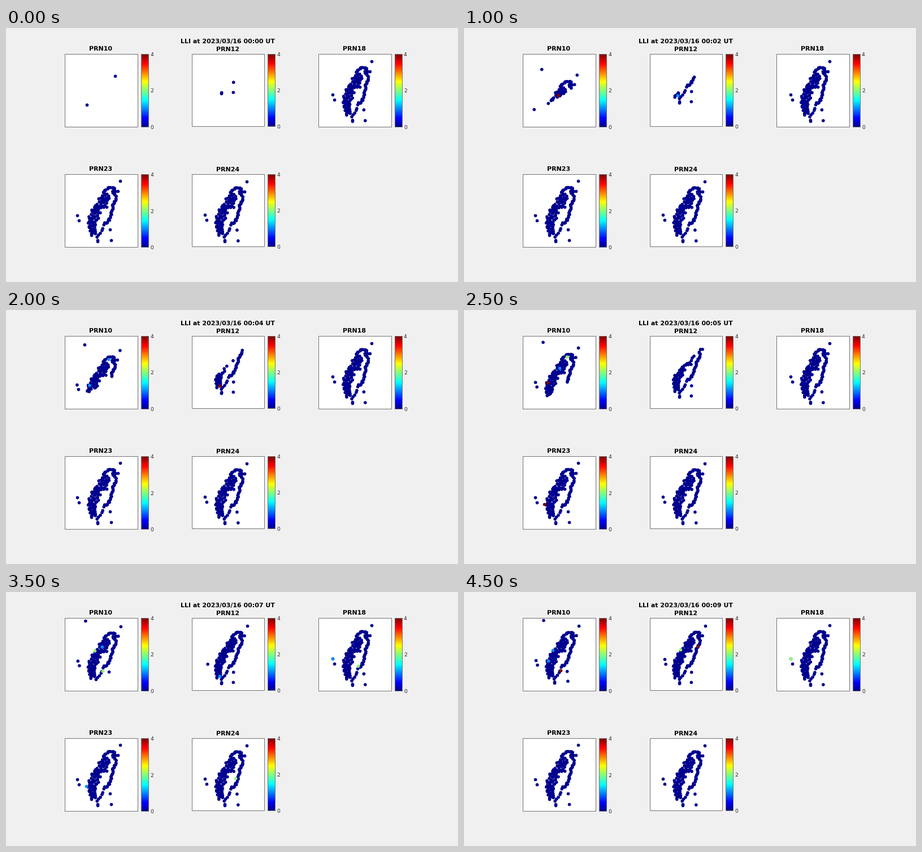
These frames come from a looping animation (800x450 px, 5 s). A matplotlib script:

```python
import numpy as np
import matplotlib.pyplot as plt
from matplotlib.animation import FuncAnimation
from matplotlib.colors import ListedColormap
from matplotlib.patches import Rectangle

W, H, DPI = 800, 450, 100
PX = 72 / DPI
FRAMES, STEP = 10, 500
LEVELS = 64

ramp = np.arange(1, LEVELS + 1) / LEVELS
JET = np.clip([1.5 - abs(4 * ramp - c) for c in (3, 2, 1)], 0, 1).T

# name: left, top, size and where the north-east, west and south stations appear
PANELS = {
    "PRN10": (104, 46, 129, [(99, 14), (23, 75), (56, 115)]),
    "PRN12": (329, 46, 128, [(98, 14), (26, 73), (52, 116)]),
    "PRN18": (553, 46, 129, [(94, 13), (25, 72), (60, 119)]),
    "PRN23": (104, 259, 129, [(98, 12), (22, 73), (58, 119)]),
    "PRN24": (329, 259, 128, [(97, 13), (23, 72), (58, 119)]),
}

# Stations off the main island and at its southern end
ISLETS = [(98, 12), (94, 30), (22, 73), (25, 82), (80, 98), (82, 117),
          (58, 119), (58, 117), (47, 108)]
CAP = [(68, 30), (79, 23), (85, 23), (90, 29)]
EAST = [(84, 30), (91, 42), (85, 55), (81, 72), (75, 86), (70, 86)]
SOUTH = [(69, 90), (68, 95), (58, 112)]
SHORE = [(67, 31), (61, 42), (49, 59), (38, 85), (47, 106)]
HILLS = [(80, 35), (75, 57), (62, 60), (62, 75), (54, 84), (55, 106)]

# Cycle slips: panel, place, first minute, level in each minute from then on
SLIPS = [
    ("PRN10", 66, 50, 2, "400101"),
    ("PRN10", 53, 57, 4, "000201"),
    ("PRN10", 79, 30, 4, "12"),
    ("PRN10", 45, 76, 4, "144001"),
    ("PRN10", 67, 93, 6, "1224"),
    ("PRN12", 49, 103, 2, "104011"),
    ("PRN12", 54, 56, 6, "4002"),
    ("PRN12", 85, 50, 6, "2004"),
    ("PRN18", 70, 85, 6, "42"),
    ("PRN18", 25, 72, 7, "122"),
    ("PRN23", 38, 85, 5, "441"),
    ("PRN24", 77, 71, 7, "2"),
]


def along(path, t):
    path = np.array(path, float)
    run = np.r_[0, np.cumsum(np.hypot(*np.diff(path, axis=0).T))]
    at = np.asarray(t) * run[-1]
    return np.c_[np.interp(at, run, path[:, 0]), np.interp(at, run, path[:, 1])]


def plain(count):
    """Spread stations evenly between the western shore and the hills."""
    i = np.arange(count)
    t = (i + 0.5) / count
    across = (i * 0.618 % 1)[:, None]
    return along(SHORE, t) * (1 - across) + along(HILLS, t) * across


def build_stations():
    rng = np.random.default_rng(7)
    coast = [along(path, np.linspace(0, 1, n))
             for path, n in ((CAP, 14), (EAST, 30), (SOUTH, 6))]
    land = np.vstack(coast + [plain(80)])
    return np.vstack([ISLETS, land + rng.uniform(-1.4, 1.4, land.shape)])


def affine_terms(points):
    return np.c_[np.asarray(points, float), np.ones(len(points))]


def project(name):
    fit = np.linalg.solve(affine_terms(PANELS["PRN23"][3]), PANELS[name][3])
    return affine_terms(stations) @ fit


stations = build_stations()
MAPS = {name: project(name) for name in PANELS}
MAPS["PRN10"] = np.vstack([MAPS["PRN10"], (36.5, 4)])


def settle(size, minute, end, power):
    return size * max(0, 1 - minute / end) ** power


def drift(name, minute):
    if name == "PRN10":
        dy = settle(38, minute, 8, 1.75)
        return np.array([-dy / 7, dy])
    if name == "PRN12":
        return np.array([0, -settle(46, minute, 6.5, 1.2)])
    return np.zeros(2)


def visible(name, minute):
    p = MAPS[name]
    x, y = p.T
    if name == "PRN10":
        if minute == 0:  # only two receivers have lock yet
            return np.array([(89, 39), (39, 90)])
        p = p[y + 0.7 * x < 79 + 10.2 * minute]
    elif name == "PRN12":
        p = p[x + y > 165.5 - 9.35 * minute]
    return p + drift(name, minute)


def label(x, y, text, size=11, **style):
    return ax.text(x, y, text, fontsize=size * PX, family="DejaVu Sans", **style)


def outline(x, y, w, h, face, z):
    ax.add_patch(Rectangle((x + 0.5, y + 0.5), w, h, fc=face, ec="0.45",
                           lw=PX, snap=False, zorder=z))


def draw_panel(name):
    left, top, size, _ = PANELS[name]
    outline(left, top, size, size, "white", 1)
    bar = left + size + 6
    ax.imshow(np.arange(LEVELS)[::-1, None], cmap=ListedColormap(JET),
              extent=(bar, bar + 13, top + size, top),
              aspect="auto", interpolation="nearest")
    outline(bar, top, 13, size, "none", 2)
    for level in (0, 2, 4):
        label(bar + 16, top + size * (1 - level / 4) + 4, level, 9.2, color="0.15")
    label(left + 43, top - 6 + (size == 128), name, weight="bold")


fig = plt.figure(figsize=(W / DPI, H / DPI), dpi=DPI, facecolor="#f0f0f0")
ax = fig.add_axes([0, 0, 1, 1])
ax.axis("off")
for name in PANELS:
    draw_panel(name)
clock = label(309, 27, "", weight="bold")
dots = ax.scatter([], [], s=(5.7 * PX) ** 2, linewidths=0, zorder=3)
ax.set_xlim(0, W)
ax.set_ylim(H, 0)


def draw(minute):
    corner = {name: np.array(p[:2]) + 0.5 for name, p in PANELS.items()}
    spots = [visible(name, minute) + corner[name] for name in PANELS]
    colors = [JET[0]] * sum(map(len, spots))
    for name, x, y, start, levels in SLIPS:
        age = minute - start
        level = int(levels[age]) if 0 <= age < len(levels) else 0
        if level:
            spots.append([corner[name] + (x, y) + drift(name, minute)])
            colors.append(JET[min(level * LEVELS // 4, LEVELS - 1)])
    dots.set_offsets(np.vstack(spots))
    dots.set_facecolors(colors)
    clock.set_text(f"LLI at 2023/03/16 00:{minute:02d} UT")
    return dots, clock


anim = FuncAnimation(fig, draw, frames=FRAMES, interval=STEP, repeat=True,
                     repeat_delay=0)
plt.show()
```
